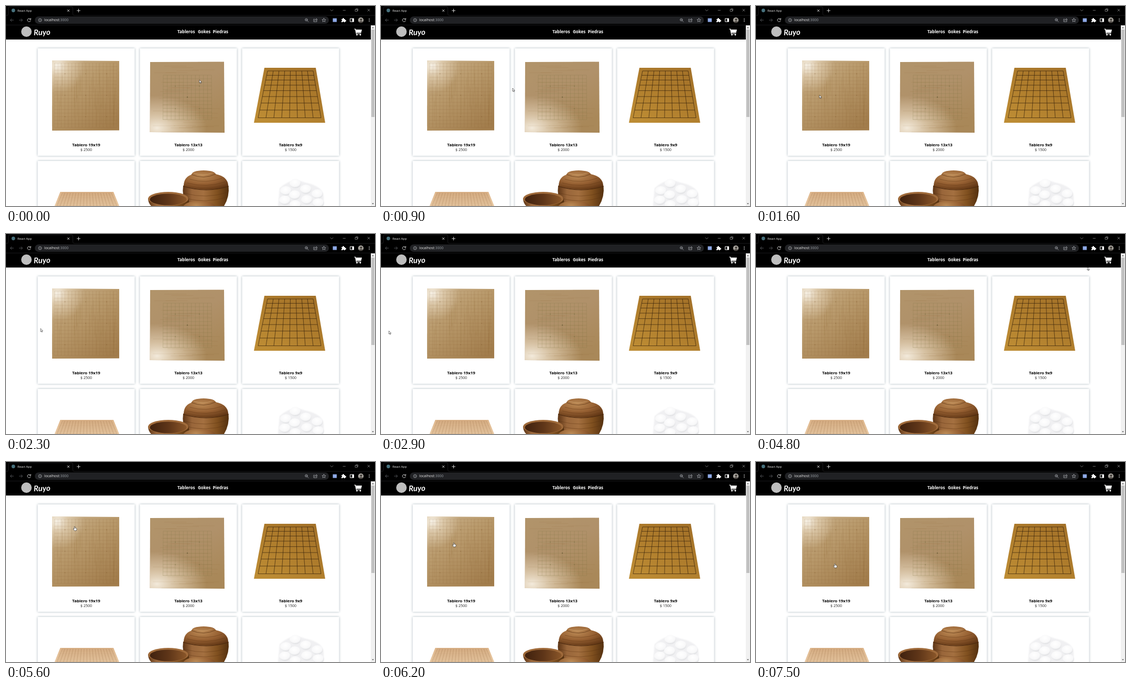
Animation of 704x382 px, one loop 8000 ms. Source, as an HTML page:

```html
<!DOCTYPE html>
<html lang="es">
<head>
<meta charset="utf-8">
<title>React App</title>
<style>
html, body { margin: 0; width: 100%; height: 100%; overflow: hidden; background: #fff; }
svg { display: block; width: 100vw; height: 100vh; }
text { font-family: "Open Sans", "Noto Sans", sans-serif; }
.line { fill: none; stroke: #fff; stroke-linecap: round; stroke-linejoin: round; }
.card { fill: #fff; filter: drop-shadow(0 0 2.2px #a8b5bc); }
.title { font-size: 7.85px; font-weight: 700; text-anchor: middle; }
.price { font-size: 7px; text-anchor: middle; fill: #222; }
.menu { font-size: 8px; font-weight: 700; fill: #fff; }
</style>
</head>
<body>
<svg viewBox="0 0 704 382" preserveAspectRatio="none">
  <defs>
    <linearGradient id="wood1" x1=".1" y1="0" x2=".8" y2="1">
      <stop stop-color="#c9b08a"/><stop offset=".4" stop-color="#b99a6c"/><stop offset="1" stop-color="#a27d4c"/>
    </linearGradient>
    <radialGradient id="glow1" gradientUnits="userSpaceOnUse" cx="98" cy="114" r="52">
      <stop stop-color="#fffdf8" stop-opacity=".85"/><stop offset=".4" stop-color="#f7ecd8" stop-opacity=".45"/><stop offset="1" stop-color="#f7ecd8" stop-opacity="0"/>
    </radialGradient>
    <linearGradient id="wood2" x2=".6" y2="1">
      <stop stop-color="#b1946a"/><stop offset=".5" stop-color="#b0916a"/><stop offset="1" stop-color="#a98859"/>
    </linearGradient>
    <radialGradient id="glow2" gradientUnits="userSpaceOnUse" cx="0" cy="0" r="1" gradientTransform="translate(288 233) scale(95 62)">
      <stop stop-color="#fffaf0" stop-opacity=".85"/><stop offset=".45" stop-color="#f6e9d2" stop-opacity=".5"/><stop offset="1" stop-color="#f6e9d2" stop-opacity="0"/>
    </radialGradient>
    <linearGradient id="wood3" x1="1" x2=".2" y2="1"><stop stop-color="#a16f28"/><stop offset=".5" stop-color="#ae7c2c"/><stop offset="1" stop-color="#bd8c34"/></linearGradient>
    <linearGradient id="wood4" x2="0" y2="1"><stop stop-color="#ddb58b"/><stop offset=".4" stop-color="#e8c8a2"/></linearGradient>
    <linearGradient id="bowl">
      <stop stop-color="#5c3415"/><stop offset=".2" stop-color="#99663a"/><stop offset=".45" stop-color="#a47040"/>
      <stop offset=".75" stop-color="#80501f"/><stop offset="1" stop-color="#54300f"/>
    </linearGradient>
    <radialGradient id="lid" cx=".4" cy=".3" r=".75"><stop stop-color="#bb8a55"/><stop offset=".55" stop-color="#966032"/><stop offset="1" stop-color="#623715"/></radialGradient>
    <linearGradient id="hollow"><stop stop-color="#3f210e"/><stop offset=".5" stop-color="#5e3518"/><stop offset="1" stop-color="#8a5629"/></linearGradient>
    <radialGradient id="stone" cx=".45" cy=".35" r=".65"><stop stop-color="#fff"/><stop offset=".7" stop-color="#f8f8f9"/><stop offset="1" stop-color="#dcdde0"/></radialGradient>
    <clipPath id="face"><circle cx="677" cy="27" r="5.2"/></clipPath>
    <filter id="soft"><feGaussianBlur stdDeviation="1.2"/></filter>
    <path id="board1" d="M88 104L216 105V237.500L88 238Z"/>
    <path id="board2" d="M275 107L416 106.500 417 242 274.500 241Z"/>
  </defs>

  <!-- Browser -->
  <path d="M0 0H704V64H0Z"/>
  <path class="line" stroke-width=".6" style="stroke:#2c2d2f" d="M0 18H2Q4.500 18 4.500 15V4Q4.500 1.500 7 1.500H125Q127.500 1.500 127.500 4V15Q127.500 18 130 18H704M0 36.300H704"/>
  <circle cx="14" cy="8.500" r="3.400" fill="#47717d"/>
  <text x="22" y="10.800" font-size="5.750" fill="#f1f1f1">React App</text>
  <rect x="55" y="20" width="561" height="14" rx="7" fill="#202124"/>
  <text x="73" y="29.400" font-size="6.850" fill="#f1f1f1">localhost<tspan fill="#9aa0a6">:3000</tspan></text>
  <path class="line" stroke-width=".8" d="M117.200 7l3.600 3.600m0-3.600l-3.600 3.600M135.500 8.800h6m-3-3v6
    M46.700 25.300a3.100 3.100 0 1 0 .3 2.700M47.200 23.600v2.200h-2.200"/>
  <path class="line" stroke-width=".6" style="stroke:#b8b8b8" d="M619 7l2.500 2.500 2.500-2.500M643 8.300h4.500M666.500 6.500h3.700v3.700h-3.700zM667.700 6.500v-1.200h3.700v3.700h-1.200M690 6l4 4m0-4l-4 4"/>
  <path class="line" stroke-width=".8" style="stroke:#606367" d="M14.300 27H8.300m2.700-2.700L8.300 27l2.700 2.700M25.300 27h6m-2.700-2.700l2.700 2.700-2.700 2.700"/>
  <path class="line" stroke-width=".7" style="stroke:#bdc1c6" d="M68 27a3 3 0 1 0-6 0 3 3 0 1 0 6 0M65 26.800v1.600M65 25.300v.1
    M575.300 26.300a2.300 2.300 0 1 0-4.600 0 2.300 2.300 0 1 0 4.600 0M574.700 28l2.300 2.300M572 26.300h2
    M588.500 25h-1.500v5h6v-1.500M588.700 28q.3-2.700 3.300-2.700v-1.500l2 2.200-2 2.100v-1.500
    M606.500 23.500l1 2.300 2.600.2-2 1.700.7 2.500-2.300-1.400-2.300 1.400.7-2.500-2-1.700 2.600-.2z"/>
  <rect x="623.500" y="23.500" width="7.500" height="7" fill="#8ea9e6"/>
  <path fill="#fff" d="M640 25h2.200a1.400 1.400 0 1 1 2.600 0h2.200v2a1.400 1.400 0 1 1 0 2.500v1.500h-2.200a1.300 1.300 0 0 0-2.600 0H640v-2.200a1.300 1.300 0 0 0 0-2.600z"/>
  <rect x="657" y="24" width="6.500" height="6" class="line"/><rect x="660.500" y="24" width="3" height="6" fill="#fff"/>
  <g clip-path="url(#face)"><path fill="#aaa69f" d="M670 20h14v14h-14z"/><circle cx="677.500" cy="26" r="2.300" fill="#4a4541"/><path fill="#4a4541" d="M672 34q0-5 5.500-5t5.500 5z"/></g>
  <g fill="#fff"><circle cx="693" cy="24.500" r=".75"/><circle cx="693" cy="27" r=".75"/><circle cx="693" cy="29.500" r=".75"/></g>

  <!-- Site header -->
  <circle cx="39" cy="49" r="10" fill="#bebebe"/>
  <text x="53" y="56" font-size="15" font-weight="700" font-style="italic" fill="#fff" style="font-family:Lato,sans-serif" transform="rotate(-2 53 56)">Ruyo</text>
  <text class="menu" x="327" y="52.300">Tableros</text>
  <text class="menu" x="366" y="52.300">Gokes</text>
  <text class="menu" x="394.500" y="52.300">Piedras</text>
  <path fill="#fff" d="M664.500 43.500h2.600l.5 1.500h11.400l-1.500 6.200h-8.800l.2 1.200h8.500v1.200h-9.600l-1.800-8.800h-1.500z"/>
  <g fill="#fff"><circle cx="669.500" cy="55" r="1.400"/><circle cx="676" cy="55" r="1.400"/></g>

  <!-- Scrollbar -->
  <path fill="#f1f1f1" d="M696 37h8v345h-8z"/><path fill="#c1c1c1" d="M697 45h6v167h-6z"/>
  <path fill="#505050" d="M698 42.200l2-2 2 2zM698 376.800l2 2 2-2z"/>

  <g id="cards"></g>

  <use href="#board1" fill="url(#wood1)"/><use href="#board1" fill="url(#glow1)"/>
  <use href="#board2" fill="url(#wood2)"/><use href="#board2" fill="url(#glow2)"/>
  <path fill="url(#wood3)" d="M493 118H591L609 223H473Z"/>
  <path fill="url(#wood4)" d="M103.500 355H205L232 421H77Z"/>
  <g id="grids" fill="none"></g>

  <!-- Bowls -->
  <path fill="url(#bowl)" d="M338 343Q335 364 345 382H416Q427 364 424.500 343Z"/>
  <path fill="url(#lid)" d="M339 344Q339 327 354 322Q355 314.500 377 314Q398 314.500 400 321Q424 326 424 344Q382 357 339 344Z"/>
  <path class="line" stroke-width="1.2" style="stroke:#4a280e" d="M339 344.500Q382 358 424 344.500"/>
  <path class="line" stroke-width=".9" style="stroke:#6b411d" d="M354 322Q377 332 400 321"/>
  <path class="line" stroke-width=".6" style="stroke:#d6ab78" d="M358 319Q377 326 394 318.500"/>
  <path class="line" stroke-width=".8" style="stroke:#57310f80" d="M346 338Q382 348 418 336M351 331Q382 340 412 329M342 358Q382 369 422 356M345 368Q382 377 419 366"/>
  <path fill="url(#bowl)" d="M271 367Q271 376 277 382H349Q350 374 348 366Z"/>
  <ellipse cx="309.500" cy="368" rx="38.500" ry="13" fill="#a06b3b"/>
  <ellipse cx="309.500" cy="369.500" rx="35" ry="11" fill="url(#hollow)"/>
  <ellipse cx="369" cy="386" rx="32" ry="14" fill="url(#lid)"/>

  <!-- Stones -->
  <path fill="#f0f0f2" filter="url(#soft)" d="M522 348Q546 326 570 337Q606 344 606 365V382H519Z"/>
  <g id="stones" fill="url(#stone)"></g>

  <g id="arrow"><path d="M0 0V6L1.400 4.800 2.400 7 3.400 6.500 2.500 4.400H4.300Z" fill="#fff" stroke="#222" stroke-width=".6"/></g>
  <g id="hand"><path d="M-.8 .7Q0-.4 .8 .7V3L3.300 3.500Q4.300 3.800 4 5L3.400 8H-.6L-2.800 5Q-2.800 4-1.800 4.400L-.8 5.200Z" fill="#fff" stroke="#222" stroke-width=".6"/></g>
</svg>
<script>
const $ = id => document.getElementById(id);
const mix = (a, b, k) => a + (b - a) * k;

const columns = [[60, "19x19", 2500], [255, "13x13", 2000], [450, "9x9", 1500]];
$("cards").innerHTML = columns.map(([x, size, price]) => `
  <rect class="card" x="${x + .5}" y="81" width="185" height="205"/>
  <rect class="card" x="${x + .5}" y="296" width="185" height="205"/>
  <text class="title" x="${x + 93}" y="268">Tablero ${size}</text>
  <text class="price" x="${x + 93}" y="277">$ ${price}</text>`).join("");

// Square grid seen from the front; the ratio of the edges sets the foreshortening.
function grid(n, [tl, tr, top], [bl, br, bottom], stroke, width) {
  const ratio = (br - bl) / (tr - tl);
  let d = "";
  for (let i = 0; i < n; i++) {
    const u = i / (n - 1), v = u / ((1 - u) * ratio + u), y = mix(top, bottom, v);
    d += `M${mix(tl, tr, u)} ${top}L${mix(bl, br, u)} ${bottom}M${mix(tl, bl, v)} ${y}H${mix(tr, br, v)}`;
  }
  return `<path d="${d}" stroke="${stroke}" stroke-width="${width}"/>`;
}

function starPoints(xs, ys, color) {
  return xs.flatMap(x => ys.map(y => `<circle cx="${x}" cy="${y}" r=".8" fill="${color}"/>`)).join("");
}

function grain(x, y, w, h, vertical) {
  let d = "", seed = 7;
  const random = () => (seed = seed * 16807 % 2147483647) / 2147483647;
  for (let i = 0; i < 45; i++) {
    const a = random(), b = random() * .7;
    d += vertical ? `M${x + a * w} ${y + b * h}v${h * .3}` : `M${x + b * w} ${y + a * h}h${w * .3}`;
  }
  return `<path d="${d}" stroke="#805a28" stroke-opacity=".12" stroke-width=".8"/>`;
}

$("grids").innerHTML =
  grain(88, 105, 128, 132, true) + grain(275, 107, 141, 134, false) +
  grid(19, [92.5, 212, 109], [92, 212, 232], "#7d592b48", .5) +
  starPoints([112.5, 152, 192], [129.5, 170.5, 211.5], "#7d592b88") +
  grid(13, [300, 392, 132], [299.5, 392.5, 217], "#706a3860", .5) +
  starPoints([323, 369], [153, 196], "#5c562c88") + starPoints([346], [174], "#443d20") +
  grid(9, [499, 586, 124], [481, 601, 213.5], "#2d1b08", .65) +
  grid(19, [107, 201.5, 357], [82, 227, 418], "#956a4299", .5);

$("stones").innerHTML = [[552, 339], [572, 350], [534, 353], [594, 359], [551, 361],
  [574, 370], [532, 371], [596, 376], [552, 380]]
  .map(([x, y]) => `<ellipse cx="${x}" cy="${y}" rx="11" ry="9"/>`).join("");

// Pointer path: time, x, y
const path = [
  [0, 369, 141], [500, 309, 152], [600, 309, 152], [1500, 135, 167], [1600, 121, 170],
  [2000, 83, 179], [2100, 83, 179], [2900, 15, 185], [3000, 80, 195], [3600, 540, 270],
  [3900, 648, 196], [4400, 615, 110], [4700, 631, 58], [4800, 632, 63], [5200, 628, 78],
  [5300, 628, 78], [5600, 131, 123], [5800, 131, 123], [6200, 139, 154], [6600, 141, 187],
  [7000, 141, 187], [7500, 150.5, 194], [8000, 150.5, 194]
];

function draw(now) {
  const t = Math.floor(now % 8000 / 100) * 100;
  const i = path.findIndex(p => p[0] > t);
  const [t0, x0, y0] = path[i - 1], [t1, x1, y1] = path[i];
  const k = (t - t0) / (t1 - t0), x = mix(x0, x1, k), y = mix(y0, y1, k);
  const overCard = y > 81 && y < 286 && columns.some(([left]) => x > left && x < left + 186);
  const link = t >= 3000 && overCard;
  $("arrow").style.display = link ? "none" : "";
  $("hand").style.display = link ? "" : "none";
  $(link ? "hand" : "arrow").setAttribute("transform", `translate(${x} ${y})`);
  requestAnimationFrame(draw);
}
draw(performance.now());
</script>
</body>
</html>
```
